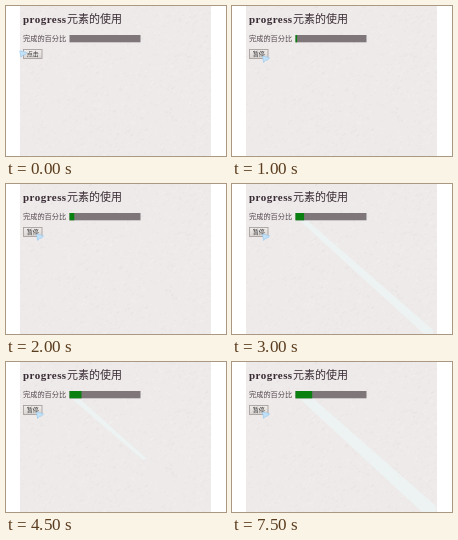
An HTML page with a canvas that plays this animation: 220 by 150 pixels, repeating every 8000 ms.

```html
<!DOCTYPE html>
<html lang="zh">
<head>
<meta charset="utf-8">
<style>
  html, body { margin: 0; width: 100%; height: 100%; overflow: hidden; background: #fff; }
  canvas, svg { position: absolute; left: 0; top: 0; width: 220px; height: 150px; }
  text { font-family: "Liberation Serif", "Noto Sans CJK SC", "Noto Sans CJK", serif; fill: #51434a; }
  .title { font-size: 11px; font-weight: 500; fill: #3a2c35; }
  .latin { font-weight: bold; letter-spacing: .46px; }
  .label { font-size: 7.2px; }
  .caption { font-size: 6px; fill: #333; }
</style>
</head>
<body>
<canvas id="paper" width="220" height="150"></canvas>
<svg viewBox="0 0 220 150">
  <defs>
    <linearGradient id="face" x2="0" y2="1">
      <stop offset="0" stop-color="#f0edeb"/>
      <stop offset="1" stop-color="#d9d4d1"/>
    </linearGradient>
  </defs>
  <polygon id="streak" fill="#eef4f4" opacity=".85"/>
  <text class="title" x="17" y="17.3"><tspan class="latin">progress</tspan><tspan x="61">元素的使用</tspan></text>
  <text class="label" x="17" y="35">完成的百分比</text>
  <rect x="63.5" y="29" width="71" height="7.3" fill="#7f767a"/>
  <rect id="fill" x="63.5" y="29" height="7.3" fill="#098010"/>
  <rect x="17.5" y="43.5" width="18.5" height="9" fill="url(#face)" stroke="#a8a2a0" stroke-width=".9"/>
  <text id="caption" class="caption" x="20.7" y="50.3"></text>
  <path id="cursor" d="M0 0L7 1.8L5.2 4L2.8 4.4L1.2 6.5Z" fill="#c4e2f7" stroke="#9ccaf0" stroke-width=".7"/>
</svg>
<script>
const LOOP = 8000;
const LONG = "68,37 76,37 201,146 201,150 192,150";
const WIDE = "68,37 82,37 204,144 204,150 190,150";
const MID = "66,37 74,37 141,97 137,98";
const SHORT = "78,37 85,37 105,57 101,58";

// start time, bar fill, streak outline
const steps = [
  [0, 0, ""],
  [500, .6, ""],
  [1000, 1.6, ""],
  [1500, 3.2, ""],
  [2000, 4.8, ""],
  [2500, 6.8, ""],
  [3000, 8.6, LONG],
  [3500, 10.5, LONG],
  [4000, 11.2, MID],
  [4500, 12, MID],
  [6500, 13.5, SHORT],
  [7000, 15, WIDE],
  [7500, 16.7, WIDE]
];
const el = id => document.getElementById(id);

function drawPaper() {
  const c = el("paper").getContext("2d");
  let seed = 17;
  const rnd = () => (seed = seed * 16807 % 2147483647) / 2147483647;
  c.fillStyle = "#edeae9";
  c.fillRect(14, 0, 191, 150);
  c.beginPath();
  c.rect(14, 0, 191, 150);
  c.clip();
  c.lineWidth = .7;
  for (let i = 0; i < 1500; i++) {
    const x = 12 + rnd() * 194, y = rnd() * 152, len = 1 + rnd() * 2;
    c.strokeStyle = i % 2 ? "rgba(255,255,255,.28)" : "rgba(205,197,194,.2)";
    c.beginPath();
    c.moveTo(x, y);
    c.lineTo(x + len, y - len * .7);
    c.stroke();
  }
}

function draw() {
  const t = performance.now() % LOOP;
  const [start, width, outline] = steps.filter(s => s[0] <= t).pop();
  const running = start >= 500;
  el("fill").setAttribute("width", width);
  el("streak").setAttribute("points", outline);
  el("caption").textContent = running ? "暂停" : "点击";
  el("cursor").setAttribute("transform", running ? "translate(30.5 50)" : "translate(13.8 44.8)");
  requestAnimationFrame(draw);
}

drawPaper();
draw();
</script>
</body>
</html>
```
